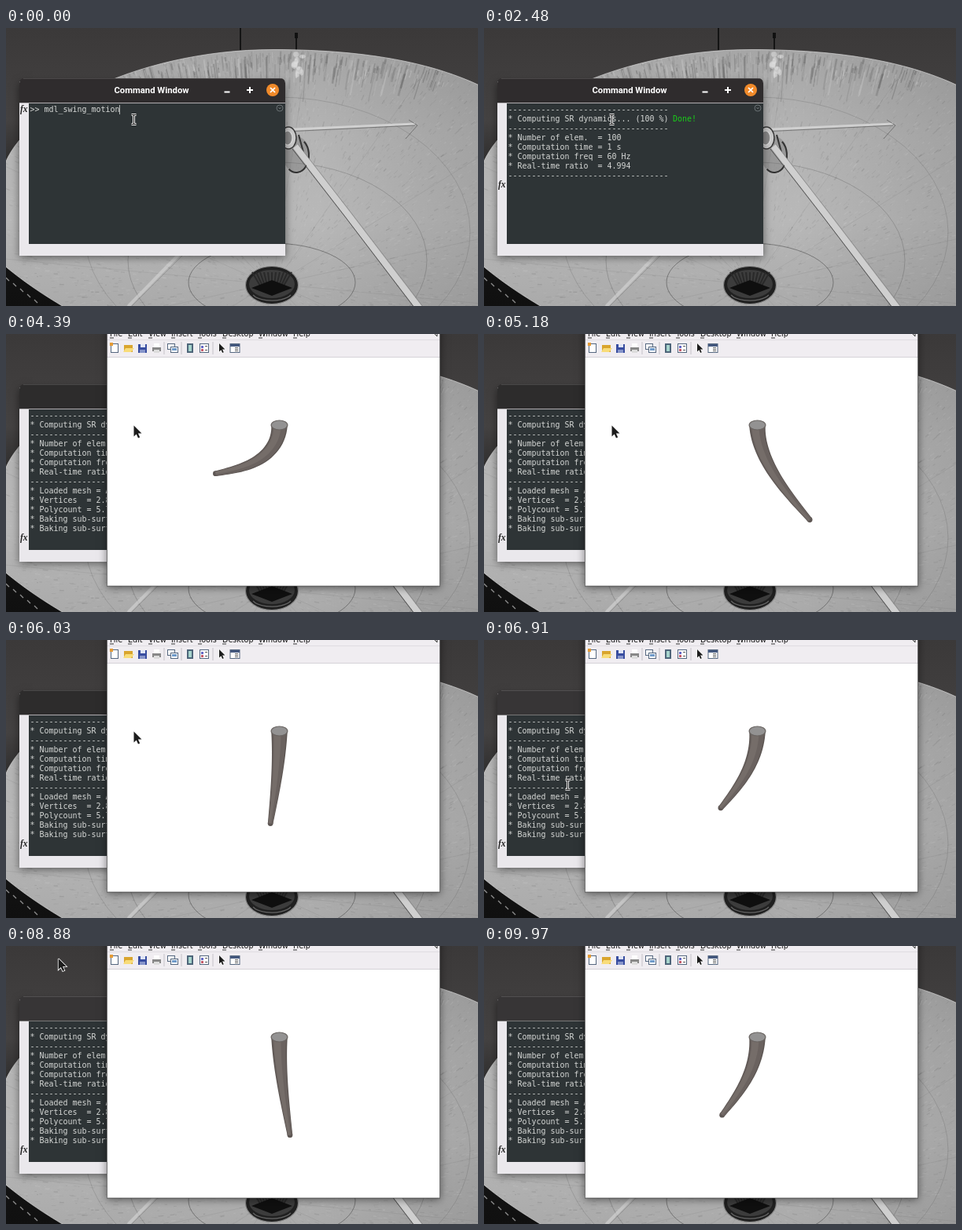
An HTML page with a canvas that plays this animation: 600x354 px, repeating every 10 s.

```html
<!DOCTYPE html>
<html lang="en">
<head>
<meta charset="utf-8">
<title>Swing simulation</title>
<style>
html, body { margin: 0; width: 100%; height: 100%; overflow: hidden; background: #333; }
canvas { display: block; width: 600px; height: 354px; }
</style>
</head>
<body>
<canvas id="stage" width="600" height="354"></canvas>
<script>
const W = 600, H = 354, LOOP = 10000, TAU = Math.PI * 2;
const MONO = '9.97px "DejaVu Sans Mono", monospace';
const TITLE = 'bold 11.3px Roboto, sans-serif';
const MENU = '9.6px "DejaVu Sans", sans-serif';
const ctx = document.getElementById('stage').getContext('2d');

const clamp = v => Math.max(0, Math.min(1, v));
const ramp = (t, a, b) => clamp((t - a) / (b - a));
const mix = (a, b, k) => a + (b - a) * k;

function rect(c, x, y, w, h, fill) {
  c.fillStyle = fill;
  c.fillRect(x, y, w, h);
}
function line(c, pts, color, width = 1) {
  c.beginPath();
  for (let i = 0; i < pts.length; i += 2) c.lineTo(pts[i], pts[i + 1]);
  c.strokeStyle = color;
  c.lineWidth = width;
  c.stroke();
}
function shape(c, pts, fill) {
  c.beginPath();
  for (let i = 0; i < pts.length; i += 2) c.lineTo(pts[i], pts[i + 1]);
  c.closePath();
  c.fillStyle = fill;
  c.fill();
}
function oval(c, x, y, rx, ry, fill, stroke, width = 1, from = 0, to = TAU) {
  c.beginPath();
  c.ellipse(x, y, rx, ry, 0, from, to);
  if (fill) { c.fillStyle = fill; c.fill(); }
  if (stroke) { c.strokeStyle = stroke; c.lineWidth = width; c.stroke(); }
}
function text(c, s, x, y, font, color, align = 'left') {
  c.font = font;
  c.fillStyle = color;
  c.textAlign = align;
  c.fillText(s, x, y);
}
function vertical(c, y0, y1, ...colors) {
  const g = c.createLinearGradient(0, y0, 0, y1);
  colors.forEach((k, i) => g.addColorStop(i / (colors.length - 1), k));
  return g;
}

// ---------- wallpaper, painted once ----------
function makeWallpaper() {
  const cv = document.createElement('canvas');
  cv.width = W; cv.height = H;
  const c = cv.getContext('2d');
  let seed = 11;
  const rnd = () => (seed = (seed * 16807) % 2147483647) / 2147483647;

  rect(c, 0, 0, W, H, vertical(c, 0, H, '#3b3939', '#444242', '#161616', '#101010'));
  line(c, [298, 0, 298, 28], '#141414', 2);
  line(c, [369, 10, 369, 29], '#141414', 2);
  rect(c, 367, 6, 4, 7, '#111');

  c.save();
  const dish = new Path2D('M-5 186C8 112 160 27.5 340 27.5C470 27.5 552 48 610 77V360H82C50 342 18 320-5 300Z');
  c.fillStyle = vertical(c, 28, H, '#a6a6a6', '#b4b4b4', '#b8b8b8', '#aaa');
  c.fill(dish);
  c.clip(dish);

  const shade = c.createLinearGradient(400, 0, 600, 0);
  shade.addColorStop(0, 'rgba(90,90,90,0)');
  shade.addColorStop(1, 'rgba(90,90,90,.2)');
  rect(c, 0, 0, W, H, shade);

  // fine weathering that runs towards the hub
  for (let i = 0; i < 5000; i++) {
    const x = rnd() * W, y = 25 + rnd() * 330, len = 1 + rnd() * 6;
    const dx = 340 - x, dy = 330 - y, d = Math.hypot(dx, dy) + 1;
    const tone = rnd() < .5 ? '70,70,70' : '225,225,225';
    line(c, [x, y, x + dx / d * len, y + dy / d * len], `rgba(${tone},${.03 + rnd() * .12})`, .5 + rnd());
  }
  // stains hanging from the rim
  for (let i = 0; i < 330; i++) {
    const x = 150 + rnd() * 410, y = 29 + Math.pow((x - 345) / 250, 2) * 27 + rnd() * 22, len = 4 + rnd() * rnd() * 50;
    const tone = rnd() < .68 ? '60,60,60' : '225,225,225';
    line(c, [x, y, x + (340 - x) * len / 600, y + len], `rgba(${tone},${.06 + rnd() * .2})`, .6 + rnd() * 2);
  }
  for (let i = 0; i < 14; i++) {
    oval(c, 366 + rnd() * 13, 33 + rnd() * 28, 1 + rnd() * 3, 2 + rnd() * 4, 'rgba(222,222,222,.55)');
  }

  for (let i = 0; i < 16; i++) {
    const a = i / 16 * TAU + .12;
    line(c, [338 + Math.cos(a) * 36, 326 + Math.sin(a) * 24, 338 + Math.cos(a) * 420, 326 + Math.sin(a) * 330], 'rgba(80,80,80,.16)', .7);
  }
  oval(c, 338, 324, 106, 50, null, 'rgba(60,60,60,.55)', .9);
  oval(c, 345, 296, 190, 125, null, 'rgba(70,70,70,.35)', .8);
  oval(c, 345, 260, 245, 172, null, 'rgba(70,70,70,.25)', .8);

  // struts and feed
  line(c, [148, 362, 222, 286], 'rgba(215,215,215,.6)', 4);
  line(c, [152, 362, 225, 289], 'rgba(80,80,80,.3)', .8);
  line(c, [365, 129, 520, 122], '#d0d0d0', 3);
  line(c, [365, 131.5, 520, 124], 'rgba(70,70,70,.6)', .9);
  line(c, [512, 117, 523, 124, 508, 141], 'rgba(60,60,60,.5)');
  oval(c, 369, 161, 17, 23, 'rgba(110,110,110,.4)');
  oval(c, 369, 162, 16, 22, null, '#333', 2, -.9, 2.2);
  line(c, [372, 136, 378, 158], '#333', 2);
  oval(c, 359, 140, 10, 14, '#cacaca', '#3a3a3a', 1.5);
  oval(c, 358, 140, 6, 9, '#8a8a8a', '#dedede', 1.2);
  shape(c, [365, 153, 371, 148, 436, 233, 533, 360, 523, 360, 430, 238], '#cfcfcf');
  line(c, [364, 154, 430, 239, 522, 360], '#505050', 1);
  line(c, [371, 148, 437, 233, 534, 360], '#858585', .8);

  // hub
  oval(c, 338, 327.5, 33.5, 24, '#202020', '#8a8a8a', 1.2);
  oval(c, 338, 326, 29, 18, '#3c3c3c');
  for (let i = -5; i < 6; i++) line(c, [338 + i * 5, 311, 338 + i * 3, 328], '#292929', 2);
  shape(c, [312, 331, 338, 321, 364, 331, 338, 341], '#0f0f0f');
  oval(c, 338, 337, 25, 10, null, '#656565', 1.3, .3, Math.PI - .3);
  c.restore();

  c.strokeStyle = 'rgba(225,225,225,.65)';
  c.lineWidth = 1;
  c.stroke(dish);
  for (let i = 0; i < 5; i++) line(c, [i * 9, 318 + i * 7, i * 9 + 4, 322 + i * 7], '#8d8d8d', 1.3);
  return cv;
}
const wallpaper = makeWallpaper();

// ---------- command window ----------
const DASH = '-'.repeat(34);
// time, line
const OUTPUT = [
  [1060, DASH],
  [1060, '* Computing SR dynamics...'],
  [2080, DASH],
  [2080, '* Number of elem.  = 100'],
  [2080, '* Computation time = 1 s'],
  [2080, '* Computation freq = 60 Hz'],
  [2080, '* Real-time ratio  = 4.994'],
  [2080, DASH],
  [2540, '* Loaded mesh = Arm.stl'],
  [2600, '* Vertices  = 2.8k'],
  [2600, '* Polycount = 5.7k'],
  [2660, '* Baking sub-surface'],
  [2740, '* Baking sub-surface']
];

function shadowed(c, draw) {
  c.save();
  c.shadowColor = 'rgba(0,0,0,.5)';
  c.shadowBlur = 10;
  c.shadowOffsetY = 2;
  draw();
  c.restore();
}
function titleBar(c, w, h, label, cx, buttons, fill) {
  c.fillStyle = fill;
  c.beginPath();
  c.roundRect(0, 0, w, h, [6, 6, 0, 0]);
  c.fill();
  line(c, [5, .5, w - 5, .5], 'rgba(255,255,255,.13)');
  const y = h / 2 - 1, [a, b, d] = buttons;
  text(c, label, cx, y + 4, TITLE, '#fff', 'center');
  line(c, [a - 3.5, y + 2.5, a + 3.5, y + 2.5], '#fff', 2);
  line(c, [b - 4, y, b + 4, y], '#fff', 2);
  line(c, [b, y - 4, b, y + 4], '#fff', 2);
  oval(c, d, y, 8, 8, '#f08a2a');
  line(c, [d - 3, y - 3, d + 3, y + 3], '#fff', 1.7);
  line(c, [d + 3, y - 3, d - 3, y + 3], '#fff', 1.7);
}
function commandWindow(c, t) {
  shadowed(c, () => rect(c, 17, 68, 338, 222, '#eae8ec'));
  c.save();
  c.translate(17, 64);
  titleBar(c, 338, 32, 'Command Window', 168, [264, 293, 322],
    t < 2850 ? '#2f2c2d' : t < 6900 ? '#2d2c2c' : '#373536');
  c.restore();
  rect(c, 17, 95, 338, 1, t < 6900 ? '#b0adb0' : '#777');
  rect(c, 29, 96, 326, 179, '#2e3436');
  oval(c, 348, 102, 4, 4, null, '#697073');
  line(c, [346.5, 101, 348, 103, 349.5, 101], '#697073');

  const row = i => 107 + i * 12;
  let count = 0;
  if (t < 1060) {
    text(c, '>> mdl_swing_motion', 30.5, row(0), MONO, '#d6d8d6');
    if (t < 820) rect(c, 144, 98, 1, 12, '#b4b8b8');
  } else {
    for (const [at, s] of OUTPUT) {
      if (t < at) break;
      let out = s;
      if (count === 1) out += ` (${Math.round(ramp(t, 1060, 2060) * 100)} %)`;
      text(c, out, 30.5, row(count), MONO, '#d6d8d6');
      count++;
    }
    if (t >= 2070) text(c, 'Done!', 240, row(1), MONO, '#19cf19');
  }
  text(c, 'fx', 18, row(count), 'italic bold 11.5px "Liberation Serif", serif', '#222');
}

// ---------- figure window, in its own 424 x 362 units ----------
const MENUS = [['File', 4], ['Edit', 27], ['View', 53], ['Insert', 82], ['Tools', 116], ['Desktop', 147], ['Window', 193], ['Help', 237]];

function page(c, x, y, w = 9, h = 11) {
  rect(c, x - w / 2, y - h / 2, w, h, '#fff');
  c.strokeStyle = '#55677f';
  c.lineWidth = 1;
  c.strokeRect(x - w / 2, y - h / 2, w, h);
}
function toolbar(c) {
  const y = 59;
  page(c, 10, y);
  rect(c, 4, y - 7, 4, 4, '#e59b35');
  rect(c, 22, y - 4, 11, 9, '#d9a52e');
  shape(c, [24, y, 35, y, 31, y + 5, 21, y + 5], '#f8dc79');
  rect(c, 40, y - 5, 11, 11, '#384da0');
  rect(c, 43, y - 5, 6, 4, '#dfe5f5');
  rect(c, 42, y + 2, 7, 4, '#8795ca');
  rect(c, 58, y - 1, 11, 5, '#888');
  rect(c, 60, y - 6, 7, 5, '#fff');
  rect(c, 60, y + 2, 7, 4, '#ddd');
  page(c, 82, y - 2, 9, 7);
  page(c, 86, y + 2, 9, 7);
  rect(c, 83, y, 6, 3, '#6f9ac9');
  rect(c, 102, y - 6, 8, 12, '#4d6579');
  rect(c, 104, y - 4, 4, 8, '#a7d4cd');
  page(c, 124, y, 11, 11);
  rect(c, 120, y - 3, 3, 3, '#6468c4');
  rect(c, 120, y + 1, 3, 3, '#c45a6a');
  rect(c, 125, y - 3, 3, 1, '#555');
  rect(c, 125, y + 2, 3, 1, '#555');
  arrow(c, 143, y - 6, .75);
  page(c, 163, y, 12, 11);
  rect(c, 157, y - 5, 12, 3, '#44587e');
  for (let i = 0; i < 3; i++) rect(c, 163, y - 1 + i * 2, 4, 1, '#666');
  for (const x of [73, 95, 135]) line(c, [x, y - 8, x, y + 8], '#c4c1c7');
}
function figure(c, x, y, scale, alpha, content) {
  c.save();
  c.globalAlpha = alpha;
  c.translate(x, y);
  c.scale(scale, scale);
  shadowed(c, () => rect(c, 0, 4, 424, 358, '#fff'));
  titleBar(c, 424, 32, 'Figure 101', 212, [350, 379, 408], '#4a4849');
  rect(c, 0, 32, 424, 39, '#f0edf1');
  line(c, [0, 48.5, 424, 48.5], '#dfdce1');
  line(c, [0, 70.5, 424, 70.5], '#d5d2d8');
  for (const [s, mx] of MENUS) {
    text(c, s, mx, 44, MENU, '#151515');
    rect(c, mx, 45.5, 5, 1, '#333');
  }
  line(c, [416, 40, 420, 44, 420, 41], '#333');
  toolbar(c);
  c.save();
  c.beginPath();
  c.rect(1, 71, 419, 290);
  c.clip();
  content(c);
  c.restore();
  c.strokeStyle = 'rgba(40,40,40,.65)';
  c.lineWidth = 1;
  c.strokeRect(.5, 32, 423, 330);
  c.restore();
}

function plot(c) {
  const x0 = 55, w = 328, y0 = 263, unit = 340;
  line(c, [x0, 93, x0, 331, x0 + w, 331], '#555');
  for (let i = 0; i <= 10; i++) {
    const x = x0 + i * w / 10;
    line(c, [x, 331, x, 328], '#555');
    text(c, String(i / 2), x, 342, '8px "Liberation Sans", sans-serif', '#555', 'center');
  }
  for (let i = -2; i <= 5; i++) {
    const y = y0 - i * .1 * unit;
    line(c, [x0, y, x0 + 3, y], '#555');
    text(c, String(i / 10), x0 - 3, y + 3, '8px "Liberation Sans", sans-serif', '#555', 'right');
  }
  const curve = (f, color) => {
    const pts = [];
    for (let x = 0; x <= w; x++) pts.push(x0 + x, y0 - f(x));
    line(c, pts, color, 1);
  };
  const wave = (x, a, d, p) => (a * Math.exp(-x / d) + 7) * Math.sin(x / 22 * TAU + p);
  curve(x => wave(x, 11, 200, 2.6), '#e0542c');
  curve(x => x < 9 ? 160 * (1 - x / 9) : wave(x, 40, 120, 2.6), '#2f4656');
  curve(x => wave(x, 26, 150, 5.6) * Math.min(1, x / 20), '#4b5258');
}

function closeUp(c) {
  c.fillStyle = vertical(c, 100, 330, '#7d7672', '#756e6b', '#6c6562');
  c.beginPath();
  c.moveTo(216, 101);
  c.quadraticCurveTo(290, 117, 420, 124);
  c.lineTo(420, 297);
  c.quadraticCurveTo(300, 304, 232, 320);
  c.fill();
  oval(c, 216.5, 211, 115.5, 110, '#8b8582', '#7a7471', 1.5);
}

// ---------- swinging arm: a damped cantilever, most bent at its root ----------
function bend(t) {
  const dt = Math.max(t, 3638) - 4330;
  return -1.17 * Math.exp(-1.17e-4 * dt) * Math.cos(TAU * dt / 1385);
}
function arm(c, t) {
  const phi = bend(t), n = 28, spine = [];
  let h = 0, v = 0;
  for (let i = 0; i <= n; i++) {
    const s = 1 + .06 * h, u = (i + .5) / n, a = phi * u * (2 - u);
    spine.push([219.5 + 131 * h * s, 157 + (121.5 * v + 31 * h) * s]);
    h += Math.sin(a) / n;
    v += Math.cos(a) / n;
  }
  const side = (from, to) => spine.map((p, i) => {
    const a = spine[Math.max(0, i - 1)], b = spine[Math.min(n, i + 1)];
    const dx = b[0] - a[0], dy = b[1] - a[1], d = Math.hypot(dx, dy), r = 10.3 - 7 * i / n;
    const off = k => [p[0] - dy / d * r * k, p[1] + dx / d * r * k];
    return [off(from), off(to)];
  });
  const band = (from, to, fill) => {
    const e = side(from, to);
    shape(c, [...e.map(q => q[0]), ...e.reverse().map(q => q[1])].flat(), fill);
  };
  const tip = spine[n];
  oval(c, tip[0], tip[1], 3.4, 3.4, '#5d5653');
  band(-1, 1, '#5c5552');
  band(-.85, .85, '#6a625f');
  band(-.2, .7, '#756d69');
  oval(c, 219.5, 157, 10.4, 6, '#939292', '#6a6562', 1.2);
}

// ---------- pointer ----------
function arrow(c, x, y, s = 1) {
  const pts = [0, 0, 0, 14, 3.2, 11, 5.5, 16, 7.7, 15, 5.4, 10, 10, 10];
  c.save();
  c.translate(x, y);
  c.scale(s, s);
  line(c, [...pts, 0, 0], '#fff', 1.6);
  shape(c, pts, '#1c1c1c');
  c.restore();
}
function beam(c, x, y) {
  for (const [color, w] of [['#f4f4f4', 3], ['#171717', 1]]) {
    line(c, [x - 3, y - 6, x + 3, y - 6], color, w);
    line(c, [x - 3, y + 6, x + 3, y + 6], color, w);
    line(c, [x, y - 6, x, y + 6], color, w);
  }
}
const POINTER = [[0, 162.5, 116.5], [6350, 162.5, 116.5], [7050, 100, 192], [7450, 105, 185], [8300, 105, 185], [9100, 58, -22], [LOOP, 58, -22]];
function pointer(c, t) {
  const i = POINTER.findIndex(p => t < p[0]);
  const a = POINTER[i - 1], b = POINTER[i], k = ramp(t, a[0], b[0]), e = k * k * (3 - 2 * k);
  const x = mix(a[1], b[1], e), y = mix(a[2], b[2], e);
  const overText = x > 29 && y > 96 && y < 275 && (t < 2850 || x < 128);
  (overText ? beam : arrow)(c, x, y);
}

function draw(t) {
  ctx.drawImage(wallpaper, 0, 0);
  commandWindow(ctx, t);
  if (t >= 2850) {
    const content = t < 3400 ? plot : t < 3500 ? closeUp : c => arm(c, t);
    figure(ctx, 128, -41, 1, ramp(t, 2820, 2940), content);
  }
  if (t >= 3180 && t < 3400) {
    const k = ramp(t, 3270, 3400);
    figure(ctx, mix(160, 128, k), mix(14, -41, k), mix(.851, 1, k), .9 * ramp(t, 3150, 3270) + .1 * k, closeUp);
  }
  pointer(ctx, t);
}
function tick() {
  draw(performance.now() % LOOP);
  requestAnimationFrame(tick);
}
tick();
</script>
</body>
</html>
```
